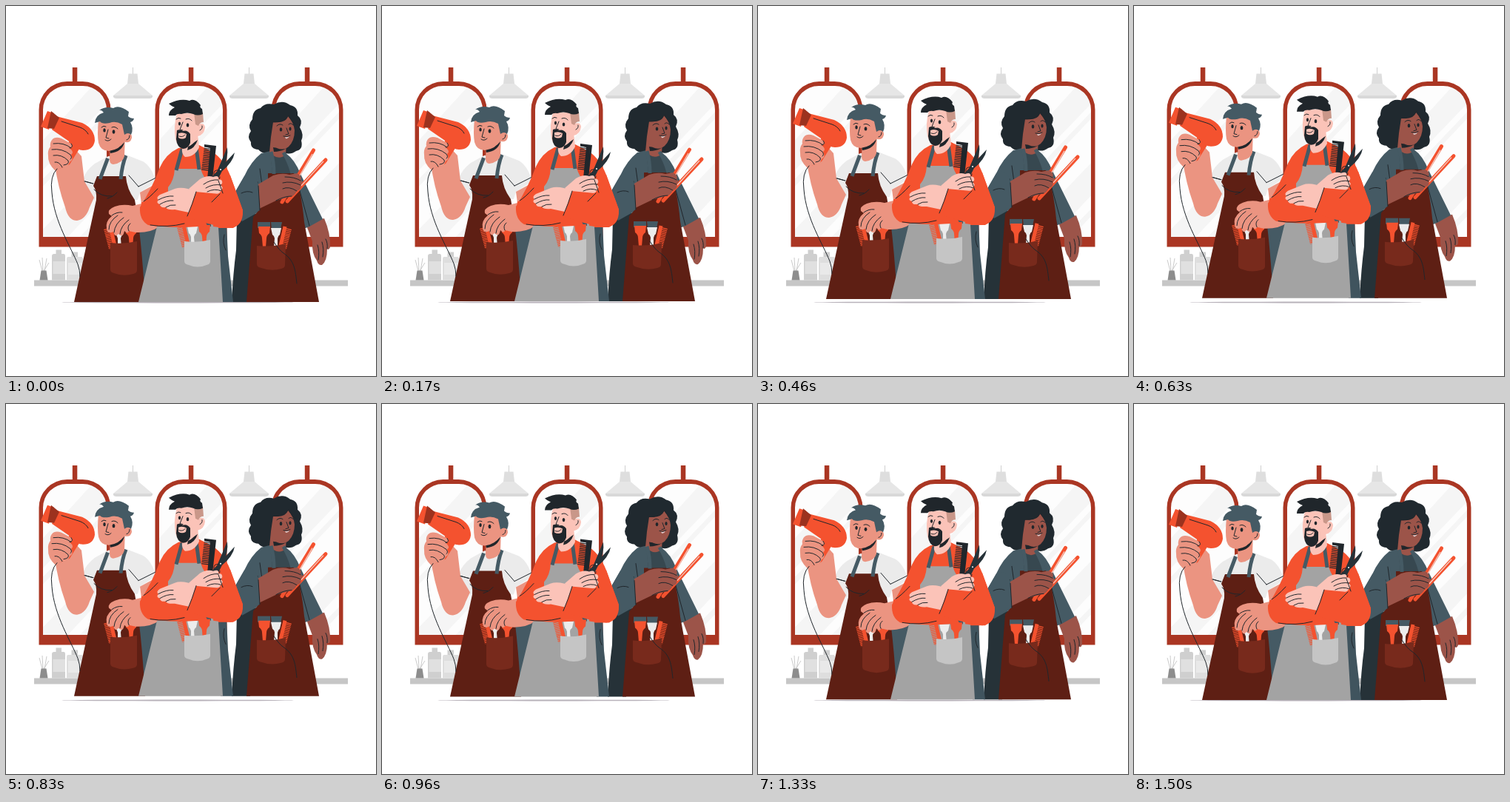
An HTML page for the animation above (1540 ms loop, 500 by 500 pixels).

```html
<!DOCTYPE html>
<html lang="en">
<head>
<meta charset="utf-8">
<title>Barbers</title>
<style>
html, body { margin: 0; width: 100%; height: 100%; overflow: hidden; background: #fff; }
svg { display: block; width: 100vw; height: 100vh; }
.ln { fill: none; stroke: #20262b; stroke-width: 1; stroke-linecap: round; stroke-linejoin: round; }
.ink { fill: #20262b; }
.slate { fill: #455a64; }
.navy { fill: #263238; }
.org { fill: #f4522f; }
.wine { fill: #5e1f14; }
.pocket { fill: #782a1c; }
.red { fill: #aa3623; }
.s1 { fill: #eb9481; }
.s2 { fill: #fbc3b8; }
.s3 { fill: #9c5449; }
.strap { fill: none; stroke: #455a64; stroke-width: 5; }
</style>
</head>
<body>
<svg viewBox="0 0 500 500">
<defs>
  <clipPath id="glass"><path d="M48 318V140A35 35 0 0 1 83 105H103A35 35 0 0 1 138 140V318Z"/></clipPath>
  <g id="mirror">
    <g clip-path="url(#glass)">
      <path fill="#fdfdfd" d="M44 100H142V322H44Z"/>
      <path fill="#f5f5f5" d="M44 188L124 100H142V126L44 228ZM44 240L142 137V146L44 250ZM44 308L142 206V250L76 320H44ZM92 320L142 268V278L102 320Z"/>
    </g>
    <path class="red" fill-rule="evenodd" d="M44.500 325.500V140A38 38 0 0 1 82.500 102H103.500A38 38 0 0 1 141.500 140V325.500ZM50 312H136V140A32 32 0 0 0 104 108H82A32 32 0 0 0 50 140Z"/>
    <path class="red" d="M89.800 83h6.500v20h-6.500Z"/>
  </g>
  <g id="lamp">
    <path stroke="#cfcfcf" d="M171.500 83V92"/>
    <path fill="#dedede" d="M165.500 91.500H177.500L179 105H164Z"/>
    <path fill="#e6e6e6" d="M164 105H179L198 121H145Z"/>
    <path fill="#d8d8d8" d="M145 121H198V123Q197 125 194 125H149Q146 125 145 123Z"/>
  </g>
  <g id="tools">
    <path fill="none" stroke="#f4522f" stroke-width="8" stroke-dasharray="1.300 1" d="M-23-21L-16 6"/>
    <path fill="none" stroke="#f4522f" stroke-width="5" d="M-18-24L-11 6"/>
    <path class="slate" d="M-14-30H1L0-20H-12Z"/>
    <path fill="#ececec" d="M-13-22H1L-1-13Q-4-11-4-8L-3 4H-8V-8Q-9-12-11-13Z"/>
    <path class="slate" d="M2-30H19V-22H2Z"/>
    <path class="org" d="M2-24H18L17-15Q13-12 13-8L12 4H8L7-8Q7-12 3-15Z"/>
  </g>
</defs>

<use href="#mirror"/><use href="#mirror" x="157"/><use href="#mirror" x="314"/>
<use href="#lamp"/><use href="#lamp" x="157"/>
<path fill="#c6c6c6" d="M38 370.500H462V378.500H38Z"/>
<path fill="none" stroke="#bdbdbd" stroke-width=".8" d="M49 358L45 343M50 358L49 340M52 358L55 341M51 358L58 347"/>
<path fill="#8d8d8d" d="M47.500 357.500H54.500L56.500 370.500H45.500Z"/>
<path fill="#cfcfcf" d="M67.500 329.500H75V335H78Q80 335 80 338V370.500H62V338Q62 335 65 335H67.500ZM88.500 332.500H97V339H88.500Z"/>
<path fill="#dedede" d="M84 339H102Q104 339 104 342V370.500H82V342Q82 339 84 339Z"/>
<path fill="#e0e0e0" d="M63.500 345H80V362H63.500Z"/>
<path fill="#e9e9e9" d="M84 347H103V363H84Z"/>
<ellipse cx="232" cy="400.500" rx="157" ry=".9" fill="#b8b2ba"/>

<g id="crew">
  <!-- left barber -->
  <g>
    <path class="slate" d="M174 285H204V330L187 372H178Z"/>
    <path fill="#ebebeb" d="M138 203L120 213Q108 222 104 234L108 258L120 262L178 262L181 252L203 238Q197 217 185 210L162 201Z"/>
    <path class="ln" stroke-width=".8" d="M179 244L203 232M179 244L166 229M107 237L117 240"/>
    <path class="s1" d="M66 214Q70 244 80 272Q84 290 96 290Q108 288 113 272L119 259L106 237L102 203L90 190Z"/>
    <path class="ln" d="M106 237L118 240"/>
    <path class="wine" d="M123 230H162Q163 247 174 262Q183 310 188 400H92L122 262Q123 250 118 243Z"/>
    <path class="ln" d="M119 248Q128 258 143 257M150 252Q145 258 137 260"/>
    <path class="strap" d="M137.500 206L127 234M162 202Q157 214 155 234"/>
    <path class="s1" d="M141 184L161 174L160 203Q158 212 145 214Q140 214 140 207Z"/>
    <path class="ink" d="M140 194Q152 194 160 184Q157 197 141 199Z"/>
    <path class="s1" d="M125 154Q123 174 125 185Q128 196 139 196Q154 194 159 183Q168 187 170 178Q170 170 162 170L158 152Z"/>
    <path class="slate" d="M120 158Q121 147 132 144Q129 140 126 141Q134 135 145 138Q153 133 166 143L165 149Q168 152 173 152Q172 156 168 157Q173 165 169 174Q165 170 160 174L157 160Q148 155 140 158Q130 160 127 156Z"/>
    <path class="ln" d="M163 181Q167 180 167 175"/>
    <ellipse class="ink" cx="133" cy="168" rx="1.700" ry="2.600"/>
    <ellipse class="ink" cx="145.500" cy="170" rx="1.900" ry="2.700"/>
    <path class="ln" stroke-width="1.500" d="M129 164Q132 161 135 163M143 164Q147 162 151 166"/>
    <path class="ln" d="M138 167L135 178L139 179M134 181Q138 184 142 180"/>
    <path class="org" d="M87 178L72 220L86 214L101 190Z"/>
    <path class="org" d="M68 149L103 158Q120 166 120 182Q118 195 104 195Q96 195 91 187L62 167ZM56 142L65 145L58 167L47 163Z"/>
    <path fill="#9c321e" d="M61 142L72 151L65 166L56 165Z"/>
    <path class="ln" stroke="#d9472a" d="M75 156L100 164Q108 167 111 173"/>
    <path class="s1" d="M62 181Q66 176 75 179L88 186Q92 191 86 192Q93 198 88 201Q92 208 86 211Q84 218 76 218L67 223Q56 213 57 202Q56 195 60 190Q59 185 62 181Z"/>
    <path class="ln" d="M64 186Q78 184 88 192M62 194Q76 192 87 201Q90 205 87 207M64 202Q75 200 84 209Q86 214 78 215M66 211Q72 210 76 218M88 186Q92 191 86 192"/>
    <path class="ln" stroke-width=".8" d="M69 220Q59 230 62 252C65 292 88 326 97 349Q100 357 100 366"/>
    <use href="#tools" x="159" y="322"/>
    <path class="pocket" d="M141 320Q159 322 177 318L177 357Q177 361 172 362Q158 366 146 361Q141 360 141 356Z"/>
    <path class="s1" d="M181 252L203 240L207 298Q195 307 175 306L166 304Q165 309 160 304Q158 314 152 308Q147 314 145 305Q137 309 136 301Q134 291 143 284L139 281Q137 275 147 271Q158 267 171 270L183 267Z"/>
    <path class="ln" d="M151 283Q139 291 139 302M159 286Q147 294 146 306M166 289Q155 297 154 308M166 304Q163 298 168 294M143 283Q150 278 157 279"/>
  </g>

  <!-- right barber -->
  <g>
    <path class="navy" d="M312 286L340 280L330 400H305Q307 360 311 330Z"/>
    <path class="s3" d="M405 294L430 287Q439 308 438 326Q436 331 434 328Q434 345 427 350Q422 351 420 344Q413 335 414 318Z"/>
    <path class="ln" d="M434 328Q435 320 432 315M428 339Q430 328 427 319M422 343Q424 332 421 323"/>
    <path fill="#20292f" d="M344 138Q350 130 362 133Q374 126 384 134Q395 136 394 148Q402 154 397 164Q403 174 399 182Q402 194 392 196Q384 202 375 198L358 198Q347 201 341 194Q330 193 331 184Q325 177 331 169Q326 161 333 153Q333 140 344 138Z"/>
    <path class="slate" d="M357 196L345 199Q331 210 322 230L307 256Q312 278 319 291L342 278V300H405L410 298L428 288L398 227Q390 207 378 199Z"/>
    <path class="navy" opacity=".45" d="M358 197L375 198L387 222L389 238L360 236Z"/>
    <path class="ln" d="M340 238Q337 251 342 270M394 239Q402 268 410 297M343 220L346 242"/>
    <path class="s3" d="M358 177L379 183L378 201Q370 208 361 202L356 198Z"/>
    <path class="ink" d="M361 191Q371 193 381 188Q379 196 362 197Z"/>
    <path class="s3" d="M361 157Q378 159 381 149Q389 158 390 168Q390 182 382 190Q375 196 366 192Q358 187 358 177Z"/>
    <path class="ln" stroke="#20292f" stroke-width="3" d="M361 157Q377 157 382 148Q387 158 392 160"/>
    <ellipse class="ink" cx="371.500" cy="167" rx="1.800" ry="2.600"/>
    <ellipse class="ink" cx="384" cy="166" rx="1.600" ry="2.500"/>
    <path class="ln" stroke-width="1.500" d="M366 162Q370 158 374 161M382 160Q385 157 388 161"/>
    <path class="ln" d="M379 165L382 173L378 174"/>
    <path fill="#e6cfcf" d="M377 177Q380 178 383 176Q381 180 378 179Z"/>
    <path class="ln" stroke-width=".8" d="M375 176Q380 178 384 175"/>
    <path class="wine" d="M354 226H389Q391 238 397 251Q401 270 403 292L423 400H325L334 285Q349 270 354 250Z"/>
    <path class="strap" stroke="#34464f" d="M358 197Q362 211 362 227M375 198Q383 211 387 226"/>
    <use href="#tools" transform="translate(359 322) scale(-1 1)"/>
    <path class="pocket" d="M339 324Q360 326 378 321L377 350Q377 354 372 355Q358 359 345 354Q339 353 339 349Z"/>
    <path class="ln" stroke-width=".8" d="M362 319Q369 330 375 334C390 344 391 357 393 375"/>
    <path fill="none" stroke="#f4522f" stroke-width="5" stroke-linecap="round" d="M373 265L415.500 195M380 264L432 208"/>
    <path fill="none" stroke="#f2d3cb" stroke-width="1.200" d="M397 229L414 200M399 243L429 210"/>
    <path class="s3" d="M339 242L361 229Q373 225 383 228L393 226Q401 230 398 235Q403 238 398 242Q400 248 393 250Q390 257 383 258L365 263L342 274Z"/>
    <path class="ln" d="M377 231Q390 231 398 236M374 239Q386 236 398 242M374 247Q382 243 393 250M365 263Q376 257 386 257"/>
    <path class="slate" d="M322 230Q336 222 341 242L343 276L318 288Q310 276 307 256Z"/>
    <path class="ln" d="M341 243L343 276M318 253Q326 249 333 252"/>
  </g>

  <!-- middle barber -->
  <g>
    <path fill="#40545e" d="M284 296L298 293L300 338L307 400H290Z"/>
    <path class="ln" stroke-width=".7" d="M295 309Q292 320 297 330"/>
    <path class="org" d="M233 192Q216 200 208 218Q198 245 181 272Q180 289 192 296L220 300H292L307 300Q320 292 320 276L303 229Q293 204 275 195L261 188Z"/>
    <path fill="#a3a3a3" d="M228 220H263Q267 233 277 243L280 298L287 299L293 400H179L204 298L219 297V245Q227 236 228 220Z"/>
    <path class="strap" d="M238 193L230 222M257 191L261 221"/>
    <path class="s2" d="M239 181L259 172L261 191Q255 204 242 204Q237 200 238 193Z"/>
    <path class="ink" d="M246 190L259 181Q255 193 245 195Z"/>
    <path class="s2" d="M231 145Q226 163 229 180Q232 191 241 191Q253 190 259 176Q268 174 269 164Q268 157 260 160L257 145Z"/>
    <path fill="#c99789" d="M254 144L266 144L267 157Q262 157 260 162L256 160Z"/>
    <path class="ink" d="M220 148Q220 141 228 137Q223 135 220 132Q236 124 248 128Q255 124 263 134Q261 137 265 139L266 146Q259 149 253 146Q245 143 237 146Q231 145 229 148Z"/>
    <path class="ink" d="M231 168Q235 166 239 169Q245 167 249 173L249 185Q246 193 239 193Q231 191 230 180Z"/>
    <path class="s2" d="M233 172Q239 170 244 173L243 178Q238 181 233 178Z"/>
    <path class="ln" stroke-width=".8" d="M234 176Q239 178 242 174"/>
    <ellipse class="ink" cx="234.500" cy="159" rx="1.600" ry="2.500"/>
    <ellipse class="ink" cx="245.500" cy="161" rx="1.800" ry="2.600"/>
    <path class="ln" stroke-width="1.800" d="M230 153Q233 150 236 152M243 153Q248 151 251 155"/>
    <path class="ln" d="M239 157L235 167L239 168M262 168Q266 166 265 162"/>
    <use href="#tools" x="258" y="320"/>
    <path fill="#c5c5c5" d="M241 318Q260 320 276 316L276 345Q276 349 271 350Q259 355 247 350Q241 349 241 345Z"/>
    <!-- comb and scissors -->
    <path fill="none" stroke="#20262b" stroke-width="10" stroke-dasharray="1.200 1.200" d="M273 190L269 223"/>
    <path class="ink" d="M268 187L284 189L279 234H272L276 192L268 190Z"/>
    <path class="navy" d="M299 191Q301 205 292 223L286 235L282 231ZM309 198Q307 211 291 224L279 237L278 231Z"/>
    <path class="ln" stroke-width="2" d="M287 222Q280 221 281 228M289 231Q289 236 284 237"/>
    <circle cx="290" cy="221" r="1" fill="#fff"/>
    <!-- crossed arms -->
    <path class="org" d="M183 265Q180 288 194 295Q220 302 272 297L255 258L205 265Z"/>
    <path class="s2" d="M247 247L262 234Q272 228 280 231Q288 228 287 234L291 235Q294 239 290 242Q295 246 291 250Q288 255 281 254L258 260Z"/>
    <path class="ln" d="M267 241Q277 234 287 235M270 246Q280 240 291 242M272 251Q282 246 291 250"/>
    <path class="org" d="M256 251L288 254L303 229L320 276Q321 298 303 300Q284 298 245 286Z"/>
    <path class="s2" d="M257 251Q239 243 228 247L208 255Q202 259 206 262Q202 266 208 268Q208 273 216 272Q218 276 228 275L247 279Z"/>
    <path class="ln" d="M206 262Q217 256 226 257M208 268Q218 262 226 263M216 272Q222 268 229 269M257 251Q252 268 245 284M278 265L289 254M205 247Q193 260 186 264M287 236L293 253M195 296Q218 300 241 294"/>
  </g>
</g>
</svg>
<script>
const LOOP = 1540, LOW = 1500, RISE = 5.6;
const crew = document.getElementById('crew');

function draw(ms) {
  const phase = (ms - LOW) / LOOP * 2 * Math.PI;
  const y = -RISE * (1 - Math.cos(phase)) / 2;
  crew.setAttribute('transform', `translate(0 ${y.toFixed(3)})`);
}

const start = performance.now();
function tick() {
  draw((performance.now() - start) % LOOP);
  requestAnimationFrame(tick);
}
draw(0);
requestAnimationFrame(tick);
</script>
</body>
</html>
```
